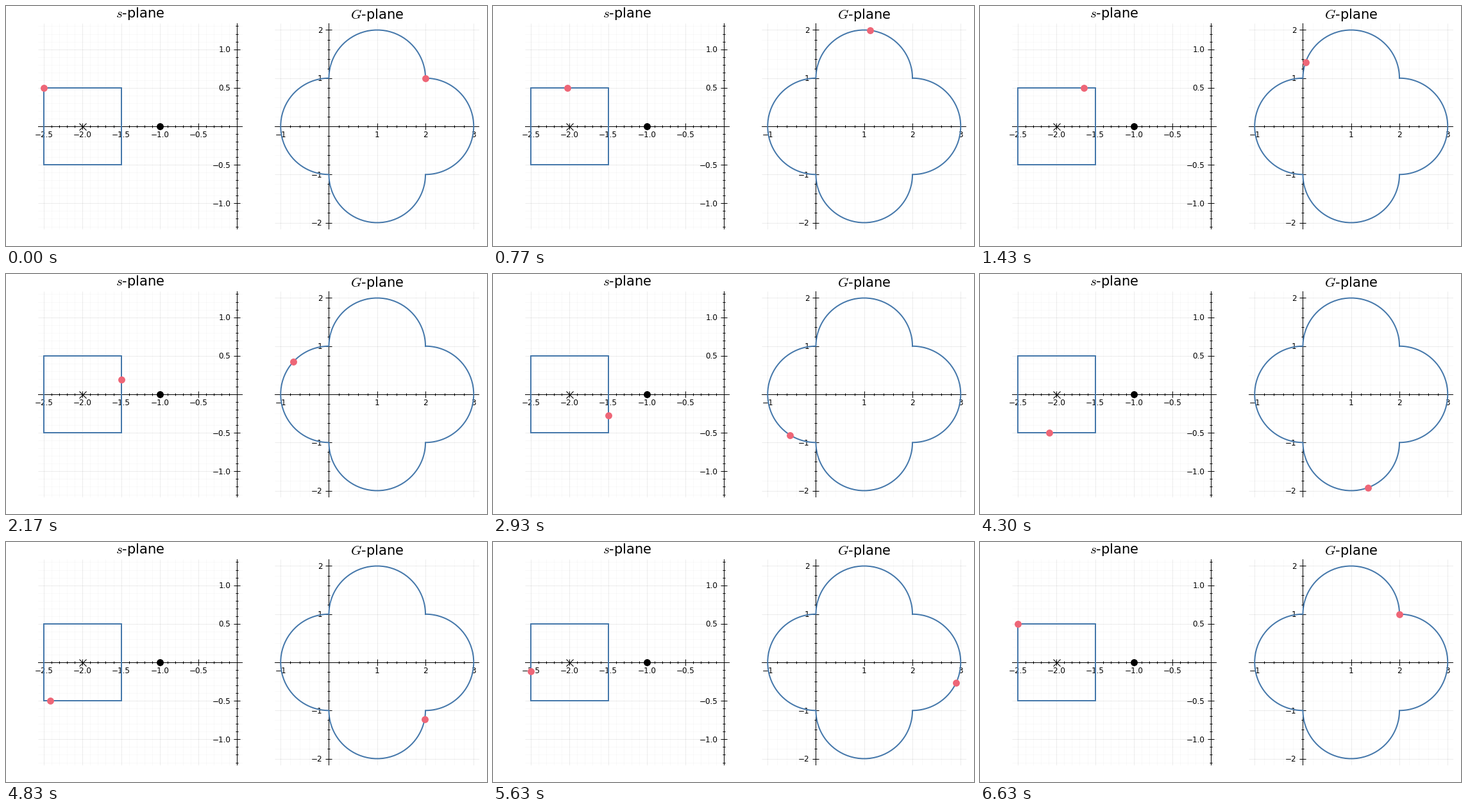
These frames come from a looping animation (750x375 px, 6.66 s). A matplotlib script:

```python
import numpy as np
import matplotlib.pyplot as plt
from matplotlib.animation import FuncAnimation

W, H, DPI = 750, 375, 100
PX = 72 / DPI  # points per pixel
BLUE, PINK = "#4477AA", "#EE6677"
SIDE = 50  # samples along each side of the square
MID_Y, HALF_H = 188, 161

plt.rcParams.update({"font.family": "DejaVu Sans", "mathtext.fontset": "cm"})


def square_path(center, side):
    """Clockwise square from the top left, corners sampled twice."""
    h = side / 2
    corners = center + h * np.array([-1 + 1j, 1 + 1j, 1 - 1j, -1 - 1j, -1 + 1j])
    return np.concatenate([np.linspace(a, b, SIDE)
                           for a, b in zip(corners, corners[1:])])


def transfer(s):
    return (s + 1) / (s + 2)


def multiples(step, lo, hi):
    return np.arange(np.ceil(lo / step), np.floor(hi / step) + 1) * step


def make_plane(left, width, xlim, major, fmt, title, baseline):
    """Axes crossing at the origin, with grid, ticks, labels and a title."""
    ax = fig.add_axes([left / W, 1 - (MID_Y + HALF_H) / H, width / W, 2 * HALF_H / H])
    ymax = HALF_H * (xlim[1] - xlim[0]) / width
    ylim = (-ymax, ymax)
    ax.set(xlim=xlim, ylim=ylim)
    ax.axis("off")

    for step, alpha, size in ((major / 5, 0.025, 5), (major, 0.05, 10)):
        xs, ys = multiples(step, *xlim), multiples(step, *ylim)
        ax.vlines(xs, *ylim, color="black", alpha=alpha, lw=PX, zorder=0)
        ax.hlines(ys, *xlim, color="black", alpha=alpha, lw=PX, zorder=0)
        tick = dict(color="black", ls="none", ms=size * PX, mew=PX, zorder=1)
        ax.plot(xs, 0 * xs, marker="|", **tick)
        ax.plot(0 * ys, ys, marker="_", **tick)
    ax.plot(xlim, (0, 0), color="black", lw=PX, zorder=1)
    ax.plot((0, 0), ylim, color="black", lw=PX, zorder=1)

    def label(value, xy, offset, ha):
        ax.annotate(format(value, fmt).replace("-", "\u2212"), xy, offset,
                    textcoords="offset pixels", ha=ha, va="baseline",
                    fontsize=12 * PX, zorder=1)

    for x in xs[np.abs(xs) > 1e-9]:
        label(x, (x, 0), (0, -17.4), "center")
    for y in ys[np.abs(ys) > 1e-9]:
        label(y, (0, y), (-10, -4.4), "right")

    fig.text((left + width / 2) / W, 1 - baseline / H, title,
             ha="center", va="baseline", fontsize=21 * PX)
    return ax


def add_curve(ax, z):
    ax.plot(z.real, z.imag, color=BLUE, lw=2 * PX, solid_joinstyle="miter", zorder=2)


def add_dot(ax, z, color):
    return ax.plot([z.real], [z.imag], "o", color=color, ms=10.9 * PX, mew=0, zorder=4)[0]


fig = plt.figure(figsize=(W / DPI, H / DPI), dpi=DPI, facecolor="white")
s_ax = make_plane(50.1, 319.1, (-2.575, 0.075), 0.5, ".1f", "$s$-plane", 17.5)
g_ax = make_plane(419.2, 319.1, (-1.12, 3.12), 1, ".0f", "$G$-plane", 20.5)

s_path = square_path(-2, 1)
g_path = transfer(s_path)
add_curve(s_ax, s_path)
add_curve(g_ax, g_path)

# Pole and zero of the transfer function
s_ax.plot([-2], [0], "x", color="black", ms=11 * PX, mew=1.1 * PX, zorder=3)
add_dot(s_ax, complex(-1, 0), "black")

dots = [(add_dot(s_ax, s_path[0], PINK), s_path),
        (add_dot(g_ax, g_path[0], PINK), g_path)]


def update(i):
    for dot, path in dots:
        dot.set_data([path[i].real], [path[i].imag])
    return [dot for dot, _ in dots]


anim = FuncAnimation(fig, update, frames=len(s_path), interval=33.3,
                     repeat=True, repeat_delay=0, blit=False)
plt.show()
```
